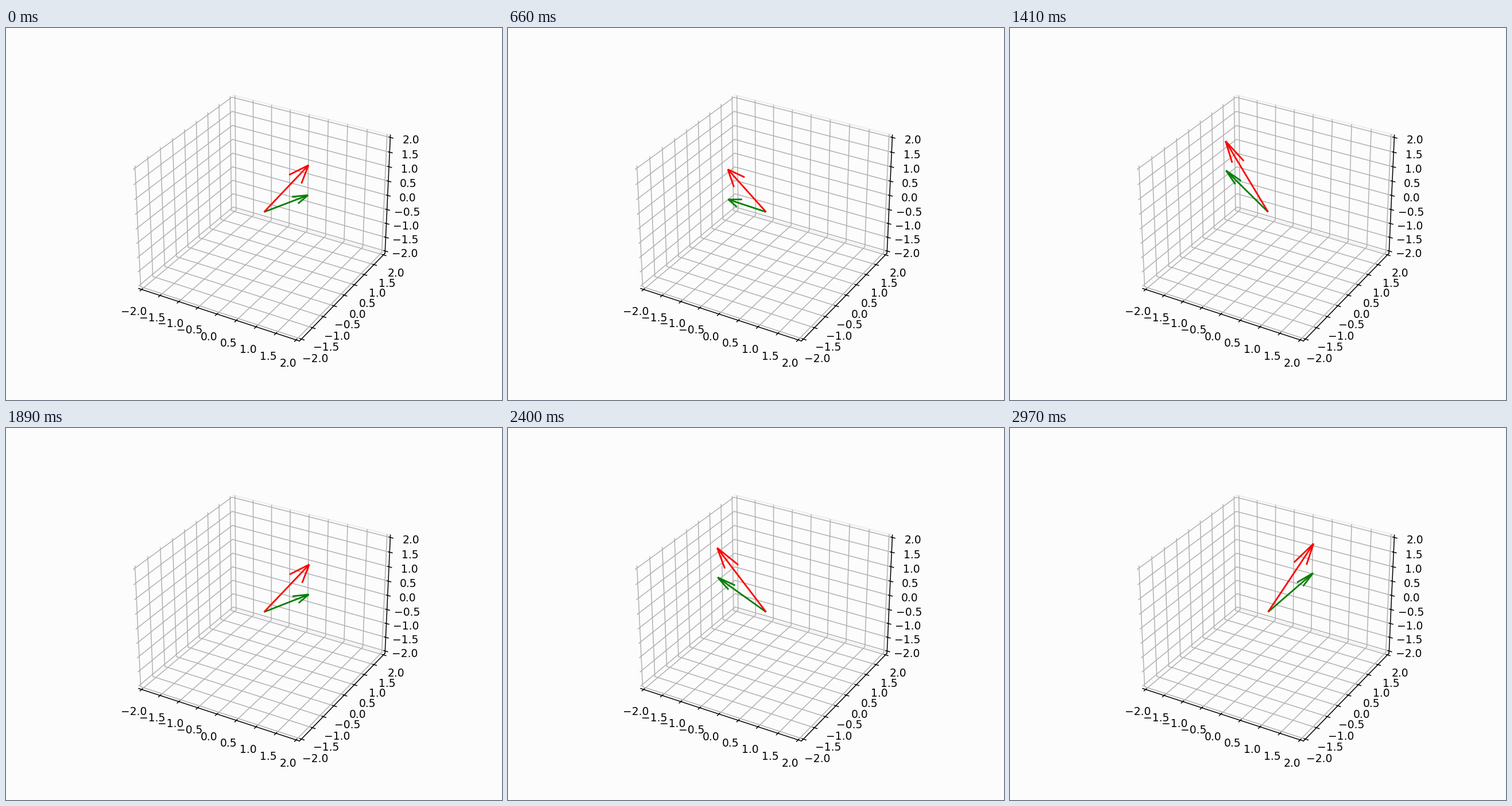
Animation of 864x648 px, one loop 3 s. Source, as a matplotlib script:

```python
import numpy as np
import matplotlib.pyplot as plt
from matplotlib.animation import FuncAnimation

FRAMES = 100
INTERVAL = 30
STEP = 0.2                   # radians per frame
RADIUS = np.sqrt(5) / 2
BACKGROUND = "#fcfcfc"
VECTORS = (("green", 1), ("red", 2))   # colour, height

fig = plt.figure(figsize=(6.4, 4.8), dpi=135, facecolor=BACKGROUND)
ax = fig.add_subplot(projection="3d", facecolor=BACKGROUND)

for set_lim in (ax.set_xlim, ax.set_ylim, ax.set_zlim):
    set_lim(-2, 2, view_margin=1 / 48)

for axis, edge in ((ax.xaxis, "0.98"), (ax.yaxis, "0.925"), (ax.zaxis, "0.95")):
    axis.pane.set_alpha(None)
    axis.pane.set_facecolor("none")
    axis.pane.set_edgecolor(edge)

arrows = []


def update(i):
    while arrows:
        arrows.pop().remove()
    x, y = RADIUS * np.cos(STEP * i), RADIUS * np.sin(STEP * i)
    for color, height in VECTORS:
        arrows.append(ax.quiver(0, 0, 0, x, y, height, color=color))
    return arrows


anim = FuncAnimation(fig, update, frames=FRAMES, interval=INTERVAL,
                     repeat=True, repeat_delay=0, blit=False)
plt.show()
```
